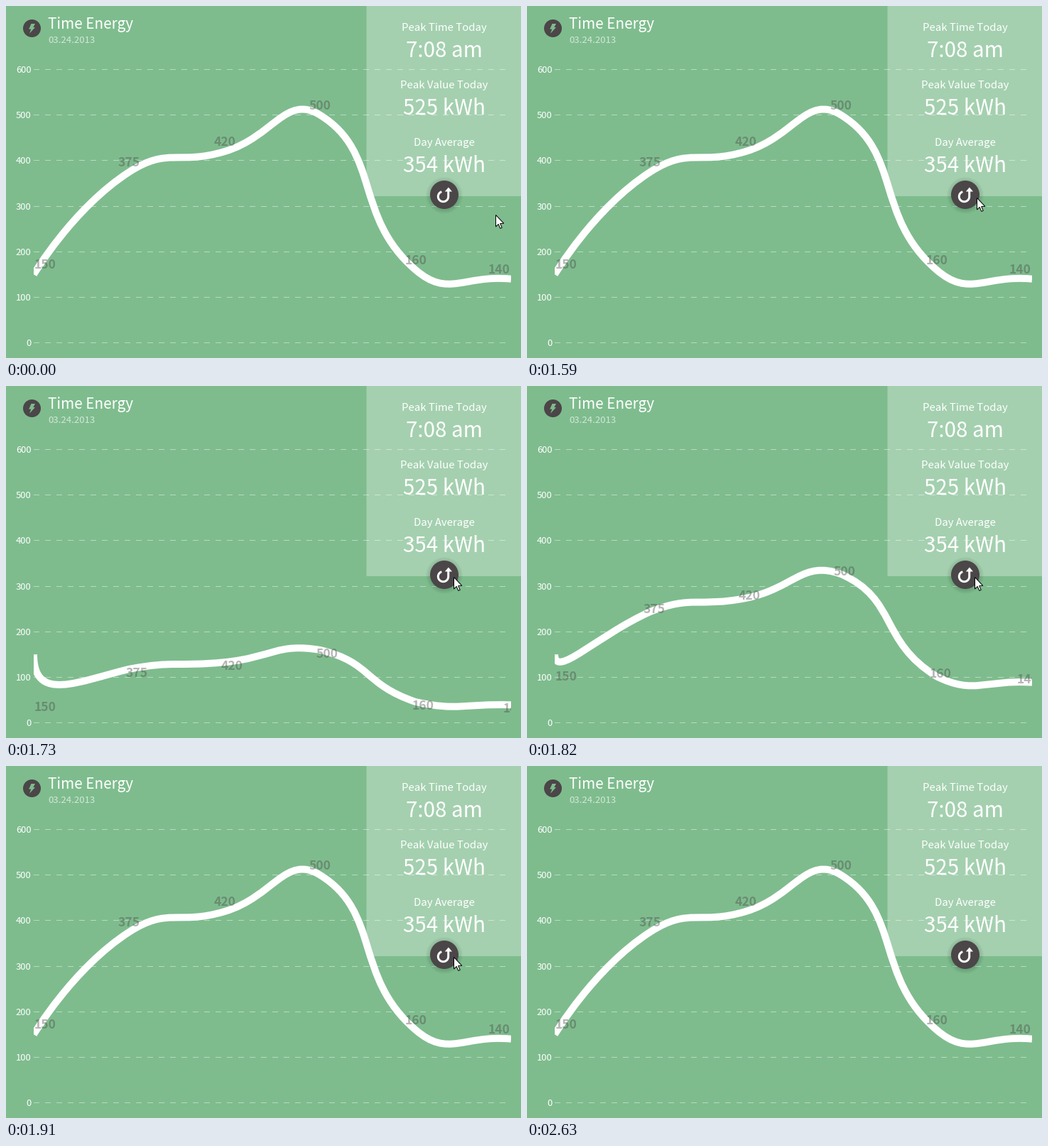
A matplotlib script for the animation above (4150 ms loop, 725x496 px).

```python
import math

import matplotlib.pyplot as plt
import numpy as np
from matplotlib.animation import FuncAnimation
from matplotlib.patches import Circle, PathPatch, Polygon, Rectangle
from matplotlib.path import Path

W, H, DPI = 725, 496, 100
LOOP, STEP = 4150, 25
PT = 72 / DPI  # points per pixel

GREEN, DARK, WHITE = "#7ebc8d", "#4b4648", "#ffffff"
LEFT, RIGHT, BOTTOM = 39, 711, 474.5
VALUES = [150, 375, 420, 500, 160, 140]

plt.rcParams["toolbar"] = "None"
plt.rcParams["font.family"] = ["Noto Sans CJK JP", "DejaVu Sans"]

fig = plt.figure(figsize=(W / DPI, H / DPI), dpi=DPI, facecolor=GREEN)
ax = fig.add_axes([0, 0, 1, 1])
ax.set_xlim(0, W)
ax.set_ylim(H, 0)
ax.axis("off")


def y_of(value):
    return BOTTOM - value * 385 / 600


def write(x, y, s, px, ha="left", color=WHITE, **kw):
    return ax.text(x, y, s, fontsize=px * PT, ha=ha, va="baseline",
                   color=color, **{"zorder": 5, **kw})


def shape(patch, z):
    patch.set_zorder(z)
    return ax.add_patch(patch)


def smooth(u):
    u = min(max(u, 0), 1)
    return u * u * (3 - 2 * u)


# Grid and axis
for v in range(0, 700, 100):
    row = math.floor(y_of(v)) + 0.5
    ax.plot([LEFT, RIGHT], [row, row], color=WHITE, alpha=0.45, lw=PT,
            ls=(0, (8, 8)), dash_capstyle="butt", snap=False, zorder=1)
    write(35.5, row + 4.5, str(v), 13, "right")

# Header
shape(Circle((36.5, 31.5), 12.5, fc=DARK, lw=0), 5)
shape(Polygon([(35.5, 25), (41, 25), (38.3, 30), (41, 30), (33, 38.8),
               (35.3, 32.6), (32.2, 32.6)], fc=GREEN, lw=0), 6)
write(59, 32, "Time Energy", 20.7)
write(59, 52, "03.24.2013", 13.2, alpha=0.65)

# Summary panel
shape(Rectangle((W * 0.7, 0), W * 0.3, 268, fc=WHITE, alpha=0.3, lw=0,
                snap=False), 4)
facts = [("Peak Time Today", "7:08 am"), ("Peak Value Today", "525 kWh"),
         ("Day Average", "354 kWh")]
for i, (name, value) in enumerate(facts):
    write(617, 35 + 81 * i, name, 14.9, "center")
    write(617, 72 + 81 * i, value, 29.5, "center")

# Reload button
for r in range(21, 27):
    shape(Circle((617, 267), r, fc="black", alpha=0.018, lw=0), 5)
shape(Circle((617, 266), 20, fc=DARK, lw=0), 6)
turn = np.radians(np.linspace(108, 360, 40))
ax.plot(np.append(615.5 + 7.2 * np.cos(turn), 622.7),
        np.append(268.5 - 7.2 * np.sin(turn), 260), color=WHITE, lw=3 * PT,
        solid_capstyle="butt", solid_joinstyle="round", zorder=7)
shape(Polygon([(617.8, 261.5), (622.9, 255.5), (628, 261.5)], fc=WHITE, lw=0), 7)

# Curve and its labels
xs = np.linspace(LEFT, RIGHT, len(VALUES))
ys = np.array([y_of(v) for v in VALUES])
window = Rectangle((LEFT, 60), RIGHT - LEFT, 415, transform=ax.transData)


def spline(x, y):
    """Bezier points whose handles share the chord by segment length."""
    p = np.column_stack([x, y])
    verts = [p[0], p[0]]
    for a, b, c in zip(p, p[1:], np.vstack([p[2:], p[-1:]])):
        before, after = math.dist(a, b), math.dist(b, c)
        pull = (c - a) / 2 / (before + after)
        verts += [b - pull * before, b, b + pull * after]
    return np.array(verts[:-1])


full = spline(xs, ys)
flat = spline(xs, np.full(len(xs), 482.0))
flat[0] = full[0]  # the path always starts from the first value
codes = [Path.MOVETO] + [Path.CURVE4] * (len(full) - 1)

curve = shape(PathPatch(Path(full, codes), fc="none", ec=WHITE, lw=10 * PT,
                        capstyle="butt", joinstyle="round"), 2)
curve.set_clip_path(window)

last = len(VALUES) - 1
labels = []
for i, v in enumerate(VALUES):
    side = "left" if i == 0 else "right" if i == last else "center"
    home = xs[i] + (0.5 if i == 0 else -1.5 if i == last else 0)
    slide = 0 if i == 0 else 31 if i == last else 15.5
    text = write(home, 0, str(v), 17.5, side, DARK, alpha=0.4,
                 weight="bold", zorder=3, clip_on=True)
    text.set_clip_path(window)
    labels.append((text, home, slide, ys[i] - 8))

# Pointer
ARROW = np.array([(0.5, 0.5), (0.5, 17), (4.2, 13.4), (6.8, 19.4), (9.2, 18.4),
                  (6.7, 12.5), (11.8, 12.3)])
pointer = shape(Polygon(ARROW, fc=WHITE, ec="black", lw=PT,
                        joinstyle="miter"), 9)
SWEEP = np.array([(689, 294), (672, 316), (612, 295), (635, 271)])
STOPS = [(1590, (635, 271)), (1610, (633, 270)), (2570, (630, 269)),
         (2600, (662, 276)), (2630, (703, 285))]
TICKS = [1610, 1650, 1690, 1730, 1760, 1805, 1850, 1880]


def pointer_at(t):
    if t < 370:
        u = smooth((math.floor((t - 30) / 31) + 1) / 12)
        weights = [math.comb(3, k) * u**k * (1 - u)**(3 - k) for k in range(4)]
        return np.dot(weights, SWEEP)
    return next((tip for end, tip in STOPS if t < end), None)


def growth_at(t):
    if t < TICKS[0] or t >= 1910:
        return 1
    tick = max(k for k in TICKS if k <= t)
    return smooth((tick - 1598) / 340)


def update(i):
    t = (i + 1) * STEP - 1
    s = growth_at(t)
    curve.set_path(Path(flat + (full - flat) * s, codes))
    for text, home, slide, base in labels:
        text.set_position((home + slide * (1 - s), 502.4 + (base - 502.4) * s))
    tip = pointer_at(t)
    pointer.set_visible(tip is not None)
    if tip is not None:
        pointer.set_xy(ARROW + np.round(tip))
    return [curve, pointer] + [item[0] for item in labels]


anim = FuncAnimation(fig, update, frames=LOOP // STEP, interval=STEP,
                     init_func=lambda: update(0), repeat=True, repeat_delay=0)
plt.show()
```
